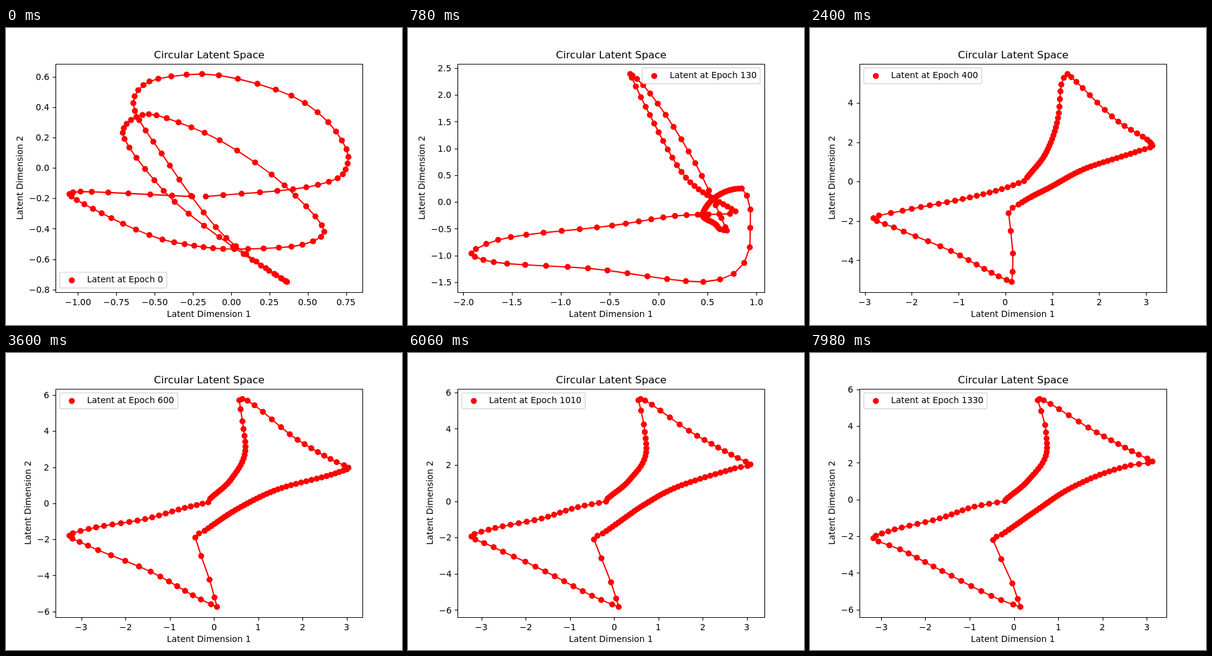
Recreate the animation shown at these times as an HTML page with a canvas. Size 640 by 480 pixels, loop 8000 ms.

```html
<!DOCTYPE html>
<html lang="en">
<head>
<meta charset="utf-8">
<title>Circular Latent Space</title>
<style>
html, body { margin: 0; width: 100%; height: 100%; overflow: hidden; background: #fff; }
canvas { display: block; width: 640px; height: 480px; }
</style>
</head>
<body>
<canvas id="plot" width="640" height="480"></canvas>
<script>
const ctx = document.getElementById('plot').getContext('2d');
const LOOP = 8000, STEP = 60, EPOCHS = 10;
const COUNT = 126;
const BOX = { l: 80, r: 576, t: 57.6, b: 427.2 };
const PT = 100 / 72, EM = 10 * PT;
const FONT = '"DejaVu Sans", Verdana, sans-serif';
const RED = '#ff0000';

// Monotone cubic through (xs, ys): smooth, sharp at turning points, never overshoots.
function curve(xs, ys) {
  const h = xs.slice(1).map((x, i) => x - xs[i]);
  const d = h.map((w, i) => (ys[i + 1] - ys[i]) / w);
  const m = xs.map((_, i) => {
    if (i === 0) return d[0];
    if (i === d.length) return d[i - 1];
    if (d[i - 1] * d[i] <= 0) return 0;
    const a = 2 * h[i] + h[i - 1], b = h[i] + 2 * h[i - 1];
    return (a + b) / (a / d[i - 1] + b / d[i]);
  });
  return x => {
    let k = 0;
    while (k < h.length - 1 && x >= xs[k + 1]) k++;
    const u = (x - xs[k]) / h[k], v = 1 - u;
    return ys[k] * (1 + 2 * u) * v * v + ys[k + 1] * u * u * (3 - 2 * u) +
      h[k] * u * v * (m[k] * v - m[k + 1] * u);
  };
}

// A key shape: a few bends of the loop on the stage, and where its axes have their zero and unit.
const keys = [];
function addKey(epoch, [ox, sx], [oy, sy], knots, bends) {
  const x = curve(knots, bends.filter((_, i) => i % 2 === 0));
  const y = curve(knots, bends.filter((_, i) => i % 2 === 1));
  const points = Array.from({ length: COUNT }, (_, i) => [(x(i) - ox) / sx, (oy - y(i)) / sy]);
  keys.push({ epoch, points });
}

// Sample numbers at which the loop bends: first the rings, then the four-pointed star.
const RINGS = [0, 6, 8, 13, 19, 25, 29, 33, 38, 43, 48, 54, 60, 66, 73, 81, 86, 92, 96, 100,
  105, 109, 112, 115, 119, 125];
const STAR = [0, 4, 10, 17, 20, 23, 28, 34, 36, 38, 40, 42, 54, 66, 79, 82, 84, 90, 97, 98,
  100, 104, 114, 125];

addKey(0, [363.9, 247.3], [225.7, 245.7], RINGS, [
  301,272, 121,264, 103,268, 155,299, 272,346, 369,357, 461,353, 514,329, 450,254,
  321,169, 231,139, 189,169, 255,263, 384,365, 454,410, 356,339, 265,222, 206,121,
  232,86, 317,74, 461,109, 533,167, 553,208, 544,236, 485,257, 323,272]);
addKey(130, [404.7, 157.4], [280.7, 86.5], STAR, [
  520,300, 450,302, 330,319, 146,342, 103,364, 139,378, 291,388, 477,410,
  526,397, 552,354, 553,293, 539,259, 494,275, 476,302, 498,318, 504,325,
  515,327, 464,218, 380,92, 370,82, 359,74, 384,127, 456,249, 529,296]);
addKey(240, [264.7, 119.9], [262.7, 52.75], STAR, [
  392,242, 351,250, 292,273, 183,297, 103,313, 160,325, 274,355, 390,403,
  416,410, 414,363, 401,288, 399,264, 426,250, 472,235, 536,214, 553,209,
  538,202, 479,146, 397,75, 394,74, 394,97, 397,139, 400,197, 395,236]);
addKey(400, [315.9, 75.6], [247.7, 31.8], STAR, [
  346,247, 310,260, 247,276, 150,295, 103,307, 136,322, 228,360, 305,401,
  326,410, 328,364, 321,299, 337,285, 388,257, 442,228, 532,198, 553,190,
  549,184, 498,151, 422,79, 416,74, 406,91, 402,137, 382,200, 351,241]);
addKey(600, [336.2, 71.4], [242.4, 29.15], STAR, [
  327,241, 289,250, 225,268, 134,284, 103,295, 133,311, 234,353, 315,398,
  341,410, 329,366, 306,298, 321,287, 375,251, 439,220, 538,192, 553,185,
  534,176, 471,140, 382,74, 377,76, 382,110, 387,151, 365,202, 330,235]);
addKey(1330, [329.5, 71.4], [236.3, 29.65], STAR, [
  315,239, 266,248, 210,267, 127,288, 103,299, 146,317, 214,352, 309,399,
  340,410, 327,372, 296,302, 310,293, 366,254, 423,217, 518,181, 553,175,
  531,164, 463,128, 371,74, 368,76, 380,116, 383,153, 354,204, 317,236]);

// One track over the epochs for each coordinate of each sample.
const epochs = keys.map(k => k.epoch);
const tracks = Array.from({ length: COUNT }, (_, i) =>
  [0, 1].map(c => curve(epochs, keys.map(k => k.points[i][c]))));

function limits(values) {
  const lo = Math.min(...values), hi = Math.max(...values), pad = (hi - lo) * 0.05;
  return [lo - pad, hi + pad];
}

function ticks([lo, hi]) {
  const raw = (hi - lo) / 9;
  const power = Math.floor(Math.log10(raw));
  const base = [1, 2, 2.5, 5, 10].find(s => s * 10 ** power >= raw);
  const step = base * 10 ** power;
  const digits = Math.max(0, (base === 2.5) - (base === 10) - power);
  const out = [];
  for (let n = Math.ceil(lo / step); n * step <= hi; n++) {
    const label = Math.abs(n * step).toFixed(digits);
    out.push({ value: n * step, label: (n < 0 ? '\u2212' : '') + label });
  }
  return out;
}

// anchor: 0 left, 0.5 centre, 1 right; text sits on whole pixels. Returns the width.
function text(str, x, y, anchor, size = EM) {
  ctx.font = size + 'px ' + FONT;
  ctx.fillStyle = '#000';
  const width = ctx.measureText(str).width;
  ctx.fillText(str, Math.round(x - width * anchor), Math.round(y));
  return width;
}

function line(x0, y0, x1, y1) {
  ctx.beginPath();
  ctx.moveTo(x0, y0);
  ctx.lineTo(x1, y1);
  ctx.stroke();
}

function dot(x, y) {
  ctx.beginPath();
  ctx.arc(x, y, 3.5 * PT, 0, Math.PI * 2);
  ctx.fill();
}

const snap = v => Math.round(v) + 0.5;

function drawAxes(xLim, yLim, toX, toY) {
  ctx.strokeStyle = '#000';
  ctx.lineWidth = 0.8 * PT;
  const bottom = snap(BOX.b), left = snap(BOX.l), top = snap(BOX.t);
  for (const t of ticks(xLim)) {
    const x = toX(t.value);
    line(snap(x), bottom, snap(x), bottom + 5);
    text(t.label, x, 448, 0.5);
  }
  let widest = 0;
  for (const t of ticks(yLim)) {
    const y = toY(t.value);
    line(left, snap(y), left - 5, snap(y));
    widest = Math.max(widest, text(t.label, 70.3, y + 5.2, 1));
  }
  ctx.strokeRect(left, top, BOX.r - BOX.l, bottom - top);
  text('Circular Latent Space', 328, 49, 0.5, 12 * PT);
  text('Latent Dimension 1', 328, 467, 0.5);
  ctx.save();
  ctx.translate(Math.round(60.8 - widest), 242);
  ctx.rotate(-Math.PI / 2);
  text('Latent Dimension 2', 0, 0, 0.5);
  ctx.restore();
}

// Legend spots in order of preference; the least covered one wins.
const SPOTS = [[1, 0], [0, 0], [0, 1], [1, 1], [1, 0.5], [0, 0.5], [0.5, 1], [0.5, 0], [0.5, 0.5]];

function bestSpot(w, h, pts) {
  const gap = EM / 2;
  let best = null;
  for (const [fx, fy] of SPOTS) {
    const x = BOX.l + gap + fx * (BOX.r - BOX.l - 2 * gap - w);
    const y = BOX.t + gap + fy * (BOX.b - BOX.t - 2 * gap - h);
    const inside = (px, py) => px > x + 1 && px < x + w - 1 && py > y + 1 && py < y + h - 1;
    const crossed = pts.slice(1).some(([bx, by], i) => {
      const [ax, ay] = pts[i];
      for (let s = 0; s < 1; s += 0.05) {
        if (inside(ax + (bx - ax) * s, ay + (by - ay) * s)) return true;
      }
      return false;
    });
    const cost = 2 * pts.filter(p => inside(...p)).length + (crossed ? 1 : 0);
    if (!best || cost < best.cost) best = { x, y, cost };
  }
  return best;
}

function drawLegend(epoch, pts) {
  const label = 'Latent at Epoch ' + epoch;
  ctx.font = EM + 'px ' + FONT;
  const w = ctx.measureText(label).width + 3.6 * EM, h = 25.4;
  const { x, y } = bestSpot(w, h, pts);
  ctx.beginPath();
  ctx.roundRect(x, y, w, h, 0.2 * EM);
  ctx.fillStyle = 'rgba(255,255,255,0.8)';
  ctx.fill();
  ctx.strokeStyle = 'rgba(204,204,204,0.8)';
  ctx.lineWidth = PT;
  ctx.stroke();
  ctx.fillStyle = RED;
  dot(x + 1.4 * EM, y + 13);
  text(label, x + 3.2 * EM, y + 16.6, 0);
}

function draw(epoch) {
  const data = tracks.map(track => track.map(f => f(epoch)));
  const xLim = limits(data.map(p => p[0])), yLim = limits(data.map(p => p[1]));
  const toX = v => BOX.l + (v - xLim[0]) / (xLim[1] - xLim[0]) * (BOX.r - BOX.l);
  const toY = v => BOX.b - (v - yLim[0]) / (yLim[1] - yLim[0]) * (BOX.b - BOX.t);
  const pts = data.map(([x, y]) => [toX(x), toY(y)]);

  ctx.fillStyle = '#fff';
  ctx.fillRect(0, 0, 640, 480);
  ctx.fillStyle = ctx.strokeStyle = RED;
  ctx.lineWidth = 1.5 * PT;
  ctx.lineJoin = 'round';
  ctx.beginPath();
  pts.forEach(([x, y]) => ctx.lineTo(x, y));
  ctx.stroke();
  pts.forEach(([x, y]) => dot(x, y));
  drawAxes(xLim, yLim, toX, toY);
  drawLegend(epoch, pts);
}

let shown = -1;
function tick() {
  const epoch = Math.floor((performance.now() % LOOP) / STEP) * EPOCHS;
  if (epoch !== shown) draw(shown = epoch);
  requestAnimationFrame(tick);
}
tick();
</script>
</body>
</html>
```
